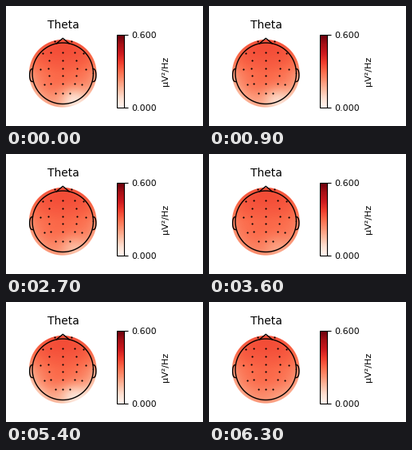
A matplotlib script for the animation above (7200 ms loop, 247 by 150 pixels).

```python
import numpy as np
import matplotlib.pyplot as plt
from matplotlib.animation import FuncAnimation
from matplotlib.patches import Circle

W, H, DPI = 247, 150, 100
CX, CY = 71.25, 84.25
R_MAP, R_HEAD = 42.4, 38.2
VMAX = 0.6
STEP_MS = 900

# Strength per step: fading of the sides and back, pale spot at the back right
FADE = [0.7, 0.8, 1, 0.5, 0.35, 0.2, 1, 0.6]
SPOT = [1, 0.8, 0.5, 0.6, 0.4, 0.2, 0.8, 0.15]

grid = np.linspace(-1, 1, 64)
U, V = np.meshgrid(grid, grid[::-1])


def sigmoid(x):
    return 1 / (1 + np.exp(-x))


def field(step):
    front = 0.1 * np.maximum(V, 0)
    sides = 0.25 * U ** 2 * sigmoid(5 * (0.1 - V))
    back = 0.17 * sigmoid(-8 * (V + 0.55))
    spot = 0.25 * np.exp(-((U - 0.3) ** 2 + (V + 0.78) ** 2) / 0.16)
    rim = 0.05 * (U ** 2 + V ** 2) ** 3
    level = 0.51 + front - rim
    return VMAX * (level - FADE[step] * (sides + back) - SPOT[step] * spot)


def outline(x, y):
    ax.plot(CX + R_HEAD * np.asarray(x), CY - R_HEAD * np.asarray(y),
            color="k", lw=1, zorder=3)


def sensors(dx, y):
    for x in {CX - dx, CX + dx}:
        ax.scatter(x, y, s=2.4, color="k", linewidths=0, zorder=4)


plt.rcParams["font.family"] = "DejaVu Sans"
fig = plt.figure(figsize=(W / DPI, H / DPI), dpi=DPI, facecolor="white")
ax = fig.add_axes([0, 0, 1, 1])
ax.axis("off")

image = ax.imshow(field(0), cmap="Reds", vmin=0, vmax=VMAX,
                  interpolation="bilinear", aspect="auto",
                  extent=[CX - R_MAP, CX + R_MAP, CY + R_MAP, CY - R_MAP])
image.set_clip_path(Circle((CX, CY), R_MAP, transform=ax.transData))
ax.set(xlim=(0, W), ylim=(H, 0))

# Head, nose and ears
angle = np.linspace(0, 2 * np.pi, 101)
outline(np.cos(angle), np.sin(angle))
nose = np.deg2rad(12)
bridge = np.sqrt(1 - nose ** 2)
outline([-nose, 0, nose], [bridge, 1.15, bridge])
turn = np.linspace(0, np.pi, 15)
ear_x = 0.99 + 0.1 * np.abs(np.sin(turn)) ** 0.7
ear_y = -0.06 + 0.21 * np.cos(turn)
for side in (-1, 1):
    outline(side * ear_x, ear_y)

# Inner grid, outer ring, forehead and back of the head
for k in range(-2, 3):
    y = 77.6 + 9.7 * k
    sensors(0, y)
    sensors(18 - 0.8 * k ** 2, y)
for k in range(-1, 2):
    sensors(28.6 - 1.1 * k - 4.2 * k ** 2, 78.8 + 19.6 * k)
sensors(10.5, 43.6)
sensors(0, 109.2)
sensors(9.2, 109.2)

ax.text(72, 28, "Theta", size=10, ha="center", va="baseline")

cax = fig.add_axes([139 / W, 1 - 127 / H, 9 / W, 91 / H])
bar = fig.colorbar(image, cax=cax, ticks=[0, VMAX], format="%.3f")
bar.ax.tick_params(labelsize=8)
bar.set_label("µV²/Hz", size=8)


def draw(step):
    image.set_data(field(step))
    return [image]


anim = FuncAnimation(fig, draw, frames=len(FADE), interval=STEP_MS,
                     repeat=True, repeat_delay=0)
plt.show()
```
